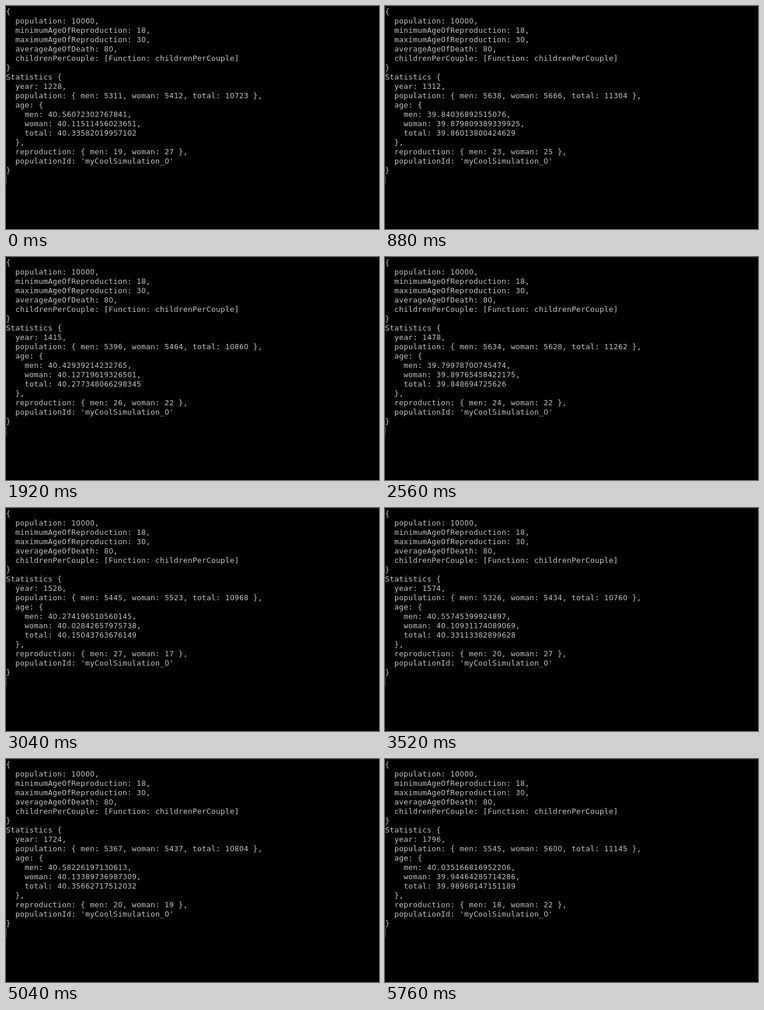
Animation, 640 px wide and 382 px high, one loop 5.84 s. Source, as an HTML page with a canvas:

```html
<!DOCTYPE html>
<html lang="en">
<head>
<meta charset="utf-8">
<title>Population simulation</title>
<style>
  html, body { margin: 0; width: 100%; height: 100%; overflow: hidden; background: #000; }
  canvas { display: block; }
</style>
</head>
<body>
<canvas id="stage" width="640" height="382"></canvas>
<script>
const ctx = document.getElementById('stage').getContext('2d');
const STEP = 80, STEPS = 73;
const CELL_W = 8, CELL_H = 16, BASELINE = 14;
const LETTER_FONT = '13px "DejaVu Sans Mono", monospace';
const DIGIT_FONT = '12px "DejaVu Sans", sans-serif'; // plain, undotted zero
const FIRST_YEAR = 1228, YEARS_PER_STEP = 7.932;

// Seeded noise in -1..1
function noise(step, channel) {
  const v = Math.sin(step * 12.9898 + channel * 78.233) * 43758.5453;
  return (v - Math.floor(v)) * 2 - 1;
}

function simulate(step) {
  // The population swells and shrinks; the mean age moves against it.
  const swing = Math.sin((step - 26.5) / 22 * 2 * Math.PI);
  const vary = (base, amplitude, spread, channel) =>
    base + amplitude * swing + spread * noise(step, channel);

  const men = Math.round(vary(5480, 160, 24, 1));
  const women = Math.round(vary(5540, 110, 24, 2));
  return {
    year: Math.max(FIRST_YEAR, Math.floor(FIRST_YEAR - 3 + step * YEARS_PER_STEP)),
    men,
    women,
    // Ages are whole years, so every mean is an integer sum over a head count.
    menYears: Math.round(men * vary(40.2, -0.4, 0.05, 3)),
    womenYears: Math.round(women * vary(40, -0.15, 0.05, 4)),
    fathers: Math.round(vary(23, 0, 5, 5)),
    mothers: Math.round(vary(21, 0, 6, 6))
  };
}

function screenLines(step) {
  const s = simulate(step);
  const total = s.men + s.women;
  return [
    '{',
    '  population: 10000,',
    '  minimumAgeOfReproduction: 18,',
    '  maximumAgeOfReproduction: 30,',
    '  averageAgeOfDeath: 80,',
    '  childrenPerCouple: [Function: childrenPerCouple]',
    '}',
    'Statistics {',
    `  year: ${s.year},`,
    `  population: { men: ${s.men}, woman: ${s.women}, total: ${total} },`,
    '  age: {',
    `    men: ${s.menYears / s.men},`,
    `    woman: ${s.womenYears / s.women},`,
    `    total: ${(s.menYears + s.womenYears) / total}`,
    '  },',
    `  reproduction: { men: ${s.fathers}, woman: ${s.mothers} },`,
    "  populationId: 'myCoolSimulation_0'",
    '}'
  ];
}

function drawLine(line, row) {
  [...line].forEach((char, col) => {
    if (char === ' ') return;
    ctx.font = /\d/.test(char) ? DIGIT_FONT : LETTER_FONT;
    ctx.fillText(char, (col + 0.5) * CELL_W, row * CELL_H + BASELINE);
  });
}

function draw(step) {
  ctx.fillStyle = '#000';
  ctx.fillRect(0, 0, 640, 382);
  ctx.fillStyle = '#1c1c1c';
  ctx.fillRect(0, 0, 640, 1);

  ctx.fillStyle = '#c4c4c4';
  ctx.textAlign = 'center';
  ctx.textBaseline = 'alphabetic';
  screenLines(step).forEach(drawLine);

  // Dotted cursor
  ctx.fillStyle = '#999';
  for (let y = 290; y < 306; y += 2) ctx.fillRect(0, y, 1, 1);
}

const start = performance.now();
let shown = -1;
function tick() {
  const step = Math.floor((performance.now() - start) / STEP) % STEPS;
  if (step !== shown) draw(shown = step);
  requestAnimationFrame(tick);
}
tick();
</script>
</body>
</html>
```
